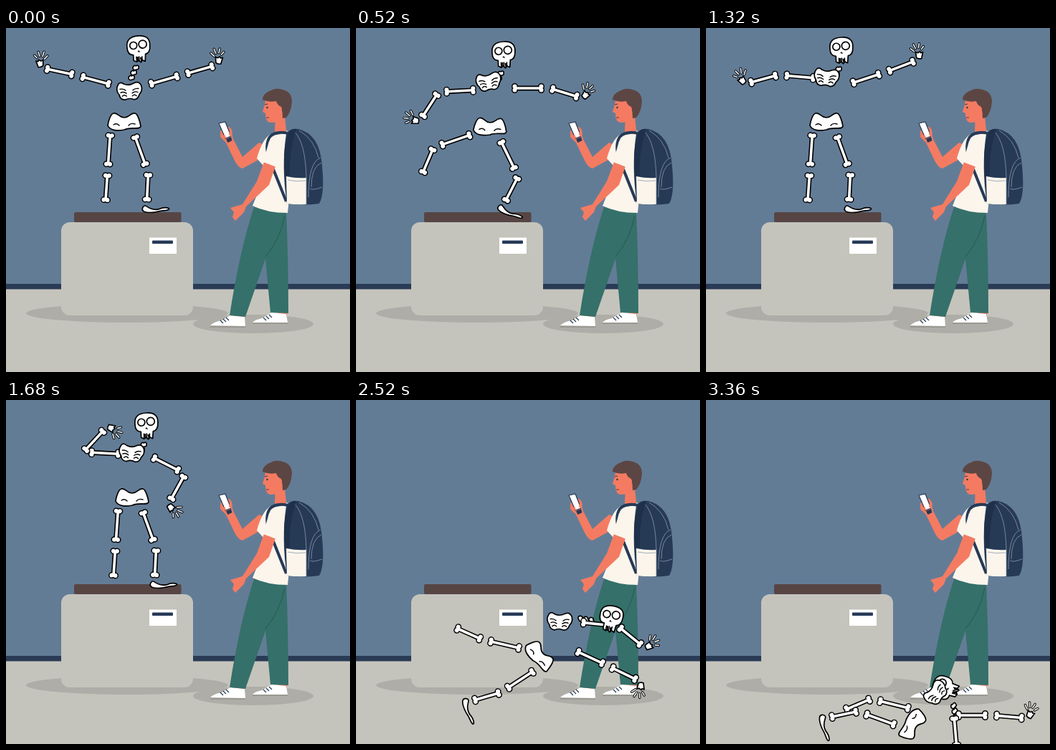
These frames come from a looping animation (480x480 px, 3.4 s). An HTML page:

```html
<!DOCTYPE html>
<html lang="en">
<head>
<meta charset="utf-8">
<title>Falling skeleton</title>
<style>
html, body { margin: 0; width: 100%; height: 100%; overflow: hidden; background: #637c96; }
svg { display: block; width: 100vw; height: 100vh; }
.ink { fill: #fff; stroke: #000; stroke-width: 1.7; stroke-linejoin: round; }
.line { fill: none; stroke: #000; stroke-width: 1.4; stroke-linecap: round; }
.round { fill: none; stroke-linecap: round; }
.seam { fill: none; stroke: #8d9aab; stroke-width: .8; }
.skin { fill: #f47b62; }
.navy { fill: #263a56; }
.shirt { fill: #fbf5ec; }
</style>
</head>
<body>
<svg viewBox="0 0 480 480">
  <rect width="480" height="480" fill="#637c96"/>
  <rect y="364" width="480" height="116" fill="#c5c4bc"/>
  <rect y="357" width="480" height="7.5" fill="#2a3b56"/>
  <g fill="#aeada7">
    <ellipse cx="169" cy="398" rx="141" ry="13"/>
    <ellipse cx="345" cy="413" rx="84" ry="13"/>
  </g>
  <rect x="77" y="271" width="184" height="130" rx="12" fill="#c4c4bc"/>
  <rect x="95" y="257" width="149.500" height="14" rx="2" fill="#574544"/>
  <rect x="200" y="292.500" width="38" height="22.500" fill="#fff"/>
  <rect x="204" y="296.500" width="29" height="4.500" rx="1" fill="#263a56"/>

  <g id="visitor">
    <path class="skin" d="M380 390V402H392V390ZM317 394L314 404H331L332 394Z"/>
    <path d="M344 411Q347 407 357 405L371 397L391 399L393 411ZM285 415Q290 410 301 408L313 401L333 403L334 416Z" fill="#fff"/>
    <path d="M344 412H393M285 417H334" stroke="#85857f"/>
    <path d="M299 408l4 4M303 406l4 4M307 404l4 4M359 404l4 4M363 402l4 4M367 400l4 4" stroke="#263a56" stroke-width="1.2"/>
    <path d="M346 250L391 256Q394 320 394 398L369 397L362 322L334 403L312 401Q326 310 346 250Z" fill="#35706a"/>
    <path d="M389 262Q382 296 362 319" fill="none" stroke="#28564f" stroke-width=".9"/>
    <path class="skin" d="M376 118L375 144Q380 150 391 143L388 112Z"/>
    <path class="skin" d="M363 97Q361 108 358 117L362 119Q362 132 370 132Q380 132 388 122V98Z"/>
    <path d="M358 104Q356 92 370 87Q376 83 386 86Q399 89 399 103Q398 117 391 125L386 126Q386 117 384 110Q378 107 377 102Q367 104 358 100Z" fill="#5c4643"/>
    <circle class="skin" cx="381" cy="114" r="4"/>
    <path d="M361 107l4-1M363 125l4 0" stroke="#533c3a" stroke-width="1.2"/>
    <circle cx="364.500" cy="111" r="1.200" fill="#333"/>
    <path class="skin" d="M364 164L352 184L330 196Q324 195 319 185L307 160L299 152L299 144L305 139L312 138L317 155L330 180L353 160Z"/>
    <path d="M297 133L306 131L314 151L306 154Z" fill="#fff" stroke="#263a56" stroke-width="1.200"/>
    <path class="skin" d="M299 148l7 2 1 4-5-1ZM313 139q4 5 2 13l-4-3Z"/>
    <path class="navy" d="M307 155l7-3 1.500 5-6 3Z"/>
    <path class="shirt" d="M369 148Q380 152 392 143Q401 150 399 200L393 258Q364 258 344 248Q354 226 360 193L350 182Q357 156 369 148Z"/>
    <path d="M394 147Q376 143 368 152Q361 163 367 182L391 242" fill="none" stroke="#263a56" stroke-width="4"/>
    <path class="skin" d="M360 187L376 193L367 219L335 249L332 257L320 269L316 264L318 257L313 251L330 246L350 214Z"/>
    <path class="shirt" d="M367 158L382 156L377 194L359 187Z"/>
    <path class="navy" d="M391 148Q396 139 408 141Q438 148 441 192Q445 232 437 245Q416 248 392 245Q384 194 391 148Z"/>
    <path class="shirt" d="M391 207Q405 210 419 209V246Q404 247 392 245Z"/>
    <path class="seam" d="M402 144Q418 160 419 209V246M422 236Q422 187 439 181M424 224Q428 227 441 222M426 222Q426 194 440 188M409 143Q430 155 436 181M393 212Q405 215 418 213"/>
    <path d="M393 150Q397 139 405 141Q394 174 396 207L390 206Q385 174 393 150Z" fill="#1f304a"/>
  </g>
  <g id="skeleton"></g>
</svg>
<script>
const LOOP = 3400, STEP = 40, CRASH = 2520, END = 3360;

const ink = d => `<path class="ink" d="${d}"/>`;
const line = d => `<path class="line" d="${d}"/>`;
const stroke = (d, color, width) =>
  `<path class="round" d="${d}" stroke="${color}" stroke-width="${width}"/>`;

function bone(length) {
  const e = length / 2;
  const shaft = `M${-e} 0H${e}`;
  const knobs = [-e, e].map(x => `M${x} -2.5h.01M${x} 2.5h.01`).join('');
  return stroke(shaft, '#000', 6.8) + stroke(knobs, '#000', 9) +
    stroke(knobs, '#fff', 6) + stroke(shaft, '#fff', 3.6);
}

function hand(side) {
  const fingers = 'M-5 -3L-8 -7M-1 -5L-2 -11M3 -4L6 -10M5 0L10 -4';
  return `<g transform="scale(${side} 1)">` + stroke(fingers, '#000', 3.4) +
    stroke(fingers, '#fff', 1.5) + ink('M-7 1L-4 2L-3 0L0 2L3 1L2 9Q-1 11 -5 10Z') + '</g>';
}

const vertebra = ink('M-4 0q2 -4 4 -2q4 -2 4 1q1 4 -3 4q-5 2 -5 -3Z');
const shapes = {
  neck: [1, 0, -1].map(i => `<g transform="translate(${3 * i} ${-7 * i})">${vertebra}</g>`).join(''),
  upperR: bone(37), lowerR: bone(35),
  thighL: bone(40), shinL: bone(34),
  thighR: bone(40), shinR: bone(34),
  foot: ink('M-18 -2Q-16 -6 -12 -3Q-4 2 4 0Q12 -4 18 -2Q20 0 15 1Q6 2 0 4Q-10 6 -16 4Q-20 2 -18 -2Z'),
  pelvis: ink('M-15 -12C-8 -13 -8 -6 0 -6C8 -6 8 -13 15 -12C19 -11 22 0 23 6C22 12 10 6 0 11C-10 13 -20 12 -23 5C-22 -2 -19 -11 -15 -12Z') +
    line('M-15 4Q-10 1 -7 5M15 3Q9 1 6 5'),
  upperL: bone(37), lowerL: bone(35),
  skull: ink('M-8 9Q-16 9 -16 -2Q-17 -17 1 -17Q17 -17 16 -3Q16 8 9 9L8 19L4 17L2 20L-1 17L-4 19L-8 17Z') +
    line('M-4 12V18M0 12V18M4 12V17') + '<path d="M-2 5L0 3L2 6ZM-4 12h3v6h-2ZM1 13h3v6h-2Z"/>' +
    '<circle class="ink" cx="-7" cy="-4" r="5"/><circle class="ink" cx="6" cy="-5" r="5.500"/>',
  ribs: ink('M-15 -10Q-12 -14 -7 -10Q0 -7 7 -11Q14 -14 17 -7Q19 0 14 5Q12 12 6 12Q0 9 -6 12Q-13 12 -14 5Q-20 -2 -15 -10Z') +
    ['', '-1 '].map(s => `<g transform="scale(${s || '1 '}1)">${line('M-13 -3Q-8 -4 -5 -1M-12 2Q-8 0 -4 3M-10 7Q-7 4 -4 7')}</g>`).join(''),
  handL: hand(1), handR: hand(-1)
};

const skeleton = document.getElementById('skeleton');
const nodes = {};
for (const name in shapes) {
  nodes[name] = document.createElementNS('http://www.w3.org/2000/svg', 'g');
  nodes[name].innerHTML = shapes[name];
  skeleton.append(nodes[name]);
}

// Chest and hips: x, y, turn. Head: offset from the chest, turn. Shoulders: offset. Limbs: two headings.
const stand = {
  at: 0, chest: [172, 88, -2], hips: [165, 131, 0], head: [13, -60, -4], neck: [0],
  shoulderL: [-14, -6], shoulderR: [16, -6],
  armL: [195, 192], armR: [-16, -16], legL: [94, 94], legR: [70, 93]
};
const loose = { ...stand, head: [21, -39, -2], shoulderL: [-3, 2], shoulderR: [18, 0] };
const fall = { ...loose, legL: [176, 185], legR: [126, 141], armR: [6, 39] };
const poses = [
  stand,
  { ...loose, at: 520, chest: [185, 75, -10], hips: [187, 138, 2], shoulderL: [-6, 11], shoulderR: [21, 9],
    armL: [177, 123], armR: [0, 17], legL: [161, 113], legR: [64, 117] },
  { ...loose, at: 1320, chest: [168, 69, 6], hips: [168, 131, 0], shoulderR: [23, 12],
    armL: [185, 165], armR: [-18, -21] },
  { ...loose, at: 1680, chest: [175, 74, 4], hips: [176, 136, 0], armL: [183, 313], armR: [27, 119] },
  { ...fall, at: 2160, chest: [236, 174, -8], hips: [210, 220, 46], armL: [166, 399] },
  { ...fall, at: CRASH, chest: [284, 309, 2], hips: [256, 357, 50], head: [72, -5, 12], neck: [75],
    shoulderL: [12, 36], armL: [25, 386], legL: [193, 204], legR: [147, 164] },
  { ...fall, at: END, chest: [321, 409, -50], hips: [288, 453, 125], head: [12, -7, -75], neck: [-35],
    shoulderL: [24, 20], shoulderR: [16, 31], armL: [85, 445], armR: [0, 5], legL: [194, 157], legR: [200, 168] }
];

// Monotone cubic through the poses, at rest on both ends.
function slope(i, read) {
  if (!i || i === poses.length - 1) return 0;
  const [a, b, c] = poses.slice(i - 1, i + 2);
  const before = (read(b) - read(a)) / (b.at - a.at);
  const after = (read(c) - read(b)) / (c.at - b.at);
  return before * after <= 0 ? 0 : 2 * before * after / (before + after);
}

function poseAt(t) {
  const i = Math.max(0, poses.findIndex(p => p.at >= t) - 1);
  const a = poses[i], b = poses[i + 1], h = b.at - a.at;
  const u = (t - a.at) / h, v = 1 - u;
  const blend = read => read(a) * v * v * (1 + 2 * u) + read(b) * u * u * (3 - 2 * u) +
    h * u * v * (v * slope(i, read) - u * slope(i + 1, read));
  const pose = {};
  for (const key in stand)
    if (key !== 'at') pose[key] = stand[key].map((_, n) => blend(p => p[key][n]));
  return pose;
}

// The point reached from [x, y] by going ahead and sideways under a heading.
function go([x, y], heading, ahead, aside = 0) {
  const r = heading * Math.PI / 180, c = Math.cos(r), s = Math.sin(r);
  return [x + ahead * c - aside * s, y + ahead * s + aside * c];
}

function place(name, [x, y], turn) {
  nodes[name].setAttribute('transform',
    `translate(${x.toFixed(2)} ${y.toFixed(2)}) rotate(${turn.toFixed(2)})`);
}

function draw(t) {
  const pose = poseAt(t);
  const { chest, hips, head } = pose;
  // The joints burst apart on impact and gather again.
  const gap = t > CRASH ? 20 * Math.sin(Math.PI * (t - CRASH) / (END - CRASH)) : 0;
  const skull = [chest[0] + head[0], chest[1] + head[1]];
  place('ribs', chest, chest[2]);
  place('pelvis', hips, hips[2]);
  place('skull', skull, head[2]);
  place('neck', go(skull, pose.neck[0], -7, 34), pose.neck[0]);

  for (const [side, sign] of [['L', 1], ['R', -1]]) {
    const shoulder = pose['shoulder' + side];
    const [upper, lower] = pose['arm' + side];
    const arm = go([chest[0] + shoulder[0], chest[1] + shoulder[1]], upper, 34);
    const forearm = go(go(arm, upper, 30 + gap), lower, 22);
    place('upper' + side, arm, upper);
    place('lower' + side, forearm, lower);
    place('hand' + side, go(forearm, lower, 29 + gap, 11 * sign), lower + (sign > 0 ? 160 : 20));

    const [thigh, shin] = pose['leg' + side];
    const hip = go(hips, hips[2], sign > 0 ? -19 : 12, sign > 0 ? 9 : 12);
    const knee = go(hip, thigh, 30);
    const calf = go(go(knee, thigh, 33 + gap), shin, 20);
    place('thigh' + side, knee, thigh);
    place('shin' + side, calf, shin);
    if (side === 'R') place('foot', go(calf, shin, 30 + gap, -13), shin - 91);
  }
}

const start = performance.now();
function tick() {
  const t = (performance.now() - start) % LOOP;
  draw(Math.floor(t / STEP) * STEP);
  requestAnimationFrame(tick);
}
tick();
</script>
</body>
</html>
```
